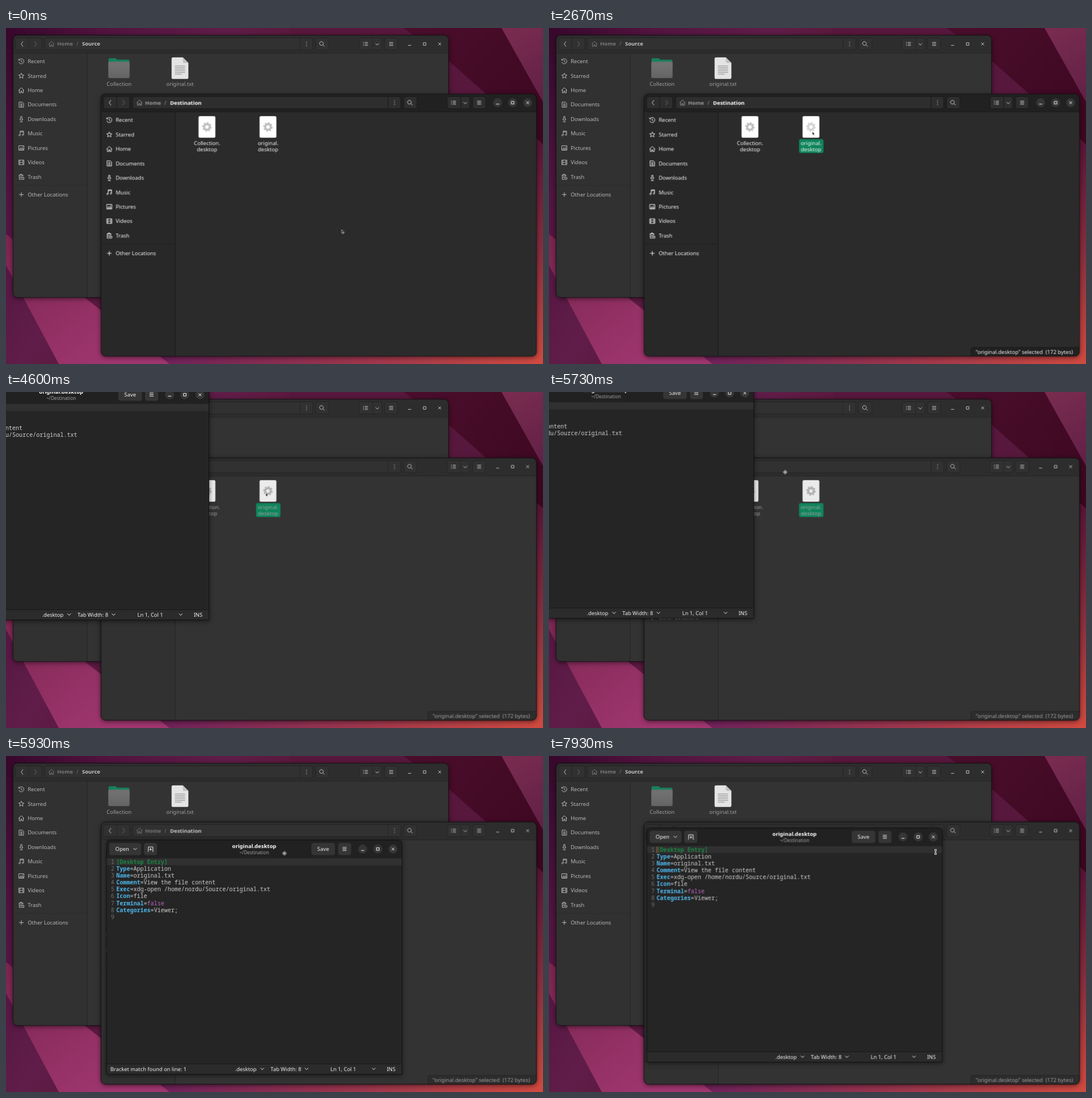
Recreate the animation shown at these times as an HTML page. Size 946 by 592 pixels, loop 8 s.

```html
<!DOCTYPE html>
<html lang="en">
<head>
<meta charset="utf-8">
<title>Desktop launcher files</title>
<style>
html, body { margin: 0; width: 100%; height: 100%; overflow: hidden; background: #37082c; }
svg { display: block; width: 100vw; height: 100vh; }
text { font: 9.5px "Noto Sans", "Open Sans", sans-serif; white-space: pre; }
.bold { font-weight: 700; }
.small { font-size: 8.2px; }
.status { font-size: 9.35px; }
.code { font: 10.05px "Noto Sans Mono", "DejaVu Sans Mono", monospace; }
.mid { text-anchor: middle; }
.end { text-anchor: end; }
.line { fill: none; stroke-width: 1; }
.shadow { filter: drop-shadow(0 2px 4px rgba(0, 0, 0, .5)); }
</style>
</head>
<body>
<svg id="stage" viewBox="0 0 946 592"></svg>
<script>
const LOOP = 8000, FRAMES = 120;

const FOCUSED = { head: '#212121', side: '#282828', body: '#2b2b2b', edge: '#191919', button: '#2e2e2e',
  text: '#f4f4f4', title: '#ffffff', label: '#f4f4f4', dim: '#9a9a9a', icon: '#dadada', paper: 1, ring: '#353535' };
const BACKDROP = { head: '#2d2d2d', side: '#313131', body: '#333333', edge: '#242424', button: '#313131',
  text: '#b8b8b8', title: '#c4c4c4', label: '#a0a0a0', dim: '#777777', icon: '#c4c4c4', paper: .9, ring: 'none' };

const ICONS = {
  Recent: 'M-4-2.3A4.5 4.5 0 1 1-4.4 1M-4.6-4.5V-2H-2.2M0-2.6V.4L2 1.6',
  Starred: 'M0-4.6 1.3-1.5 4.7-1.3 2.1.8 3 4.1 0 2.3-3 4.1-2.1.8-4.7-1.3-1.3-1.5Z',
  Home: 'M-5 .3 0-4.5 5 .3M-3.5-.8V4.5H-1V1.5H1V4.5H3.5V-.8',
  Documents: 'M-4-4.5H2L4-2.5V4.5H-4ZM-2-1.5H2M-2 .5H2M-2 2.5H2',
  Downloads: 'M-1.2-4.5H1.2V.4H3L0 3.2-3 .4H-1.2ZM-2.5 4.8H2.5',
  Music: 'M-2 3V-4.3H4V2.2M-2-2.8H4M-2 3A1.3 1.3 0 1 1-2 2.9M4 2.2A1.3 1.3 0 1 1 4 2.1',
  Pictures: 'M-4.5-4H4.5V4H-4.5ZM-3 2.5-1-.5.5 1.2 2-.6 3.2 2.5ZM1.5-2.2H2.6',
  Videos: 'M-4.5-4H4.5V4H-4.5ZM-2.7-4V4M2.7-4V4M-2.7 0H2.7',
  Trash: 'M-4.5-3H3.5M-2-3V-4.5H1V-3M-3.6-3V4.5H0M2.6-3V-.5M-1.6-1V2.5M.5-1V1M4.5 4.5H1V1H4.5Z',
  plus: 'M-4 0H4M0-4V4',
  back: 'M1.5-4.5-1.8 0 1.5 4.5',
  next: 'M-1.5-4.5 1.8 0-1.5 4.5',
  down: 'M-3-1.5 0 1.5 3-1.5',
  dots: 'M-.7-3.5H.7M-.7 0H.7M-.7 3.5H.7',
  find: 'M2-.8A3.3 3.3 0 1 1 2-.9M1.3 1.6 4.3 4.5',
  list: 'M-4.5-2.7H-3M-4.5 0H-3M-4.5 2.7H-3M-1.5-2.7H4M-1.5 0H4M-1.5 2.7H4',
  menu: 'M-3.5-2.7H3.5M-3.5 0H3.5M-3.5 2.7H3.5',
  min: 'M-2.7 2.5H2.7',
  max: 'M-2.3-2.3H2.3V2.3H-2.3Z',
  close: 'M-2.5-2.5 2.5 2.5M2.5-2.5-2.5 2.5',
  tab: 'M-4 4.5H-5M-4 4V-3.5H4V4.5H5M0-1.5V3M-2.2.8H2.2'
};

const at = (x, y, body, extra = '') => `<g transform="translate(${x} ${y})" ${extra}>${body}</g>`;
const icon = (name, x, y, color) => at(x, y, `<path class="line" stroke="${color}" d="${ICONS[name]}"/>`);
const rect = (x, y, w, h, fill, r = 0, extra = '') =>
  `<rect x="${x}" y="${y}" width="${w}" height="${h}" rx="${r}" fill="${fill}" ${extra}/>`;
const text = (str, x, y, fill, cls = '') => `<text x="${x}" y="${y + 3.4}" fill="${fill}" class="${cls}">${str}</text>`;
const poly = (points, fill) => `<polygon points="${points}" fill="${fill}"/>`;
const gradient = (id, x1, y1, x2, y2, ...stops) =>
  `<linearGradient id="${id}" gradientUnits="userSpaceOnUse" x1="${x1}" y1="${y1}" x2="${x2}" y2="${y2}">` +
  stops.map(([o, c]) => `<stop offset="${o}" stop-color="${c}"/>`).join('') + '</linearGradient>';

function wallpaper() {
  return `<defs>
    ${gradient('base', 0, 0, 946, 592, [0, '#37082c'], [.14, '#521440'], [.3, '#601d49'], [.38, '#5b193e'], [.5, '#71235a'], [.8, '#a63a4b'], [1, '#d04a40'])}
    ${gradient('band', 0, 363, 180, 592, [0, '#79264f'], [1, '#a0366f'])}
    ${gradient('glow', 873, 0, 946, 130, [0, '#7a2c50'], [1, '#612046'])}
    ${gradient('dark', 720, 0, 946, 200, [0, '#4a0e2c'], [1, '#3d0720'])}
    ${gradient('warm', 0, 205, 0, 592, [0, '#5a1638'], [.5, '#8a2f3e'], [1, '#d04a40'])}
    ${gradient('cover', 0, 54, 0, 90, [0, '#707070'], [1, '#5c5c5c'])}
    <clipPath id="frame">${rect(0, 0, 767, 462, '#000', 8)}</clipPath>
  </defs>` +
    rect(0, 0, 946, 592, 'url(#base)') +
    rect(500, 0, 446, 205, '#58183d') +
    rect(930, 200, 16, 392, 'url(#warm)') +
    poly('700,0 873,0 946,130 946,205 780,58', 'url(#dark)') +
    poly('873,0 946,0 946,130', 'url(#glow)') +
    poly('0,363 140,476 288,592 93,592 0,418', 'url(#band)');
}

const gear = (x, y) => at(x, y, `<g fill="none" stroke="currentColor">
  <circle r="4.9" stroke-width="3.6"/><circle r="7.1" stroke-width="2.6" pathLength="16" stroke-dasharray="1"/></g>`);

const launcher = (x, c, cls) => `<g opacity="${c.paper}">${rect(x - 14.8, 39, 29.6, 38, '#fff', 2.5)}
  <g class="${cls}" color="#bfbfbf">${gear(x, 58)}</g></g>`;

function folder(x) {
  return `<path fill="#17805c" d="M${x - 18.5} 75V43q0-2.5 2.5-2.5H${x - 6}l3 2.5H${x + 16}q2.5 0 2.5 2.5V60z"/>` +
    rect(x - 18.7, 46.5, 37.4, 29, 'url(#cover)', 2.5);
}

function textFile(x) {
  const rows = [...Array(6)].map((_, i) => `M${x - 9} ${54 + i * 2.9}h${i === 5 ? 12 : 18}`).join('');
  return `<path fill="#e4e4e4" d="M${x - 14.8} 41.5q0-2.5 2.5-2.5H${x + 5}l9.8 9.8V74.500q0 2.500-2.500 2.500h-24.600q-2.500 0-2.500-2.500z"/>
    <path fill="#c2c2c2" d="M${x + 5} 39v7.300q0 2.500 2.500 2.500h7.300z"/>
    <path class="line" stroke="#8d8d8d" d="${rows}"/>`;
}

function controls(xs, y, c) {
  return ['min', 'max', 'close'].map((name, i) =>
    `<circle cx="${xs[i]}" cy="${y}" r="8" fill="${c.ring}"/>` + icon(name, xs[i], y, c.title)).join('');
}

function fileWindow(c, place, content) {
  const button = (x, w) => rect(x, 4.5, w, 21.5, c.button, 3.5, `stroke="${c.edge}"`);
  const places = ['Recent', 'Starred', 'Home', 'Documents', 'Downloads', 'Music', 'Pictures', 'Videos', 'Trash'];
  const rows = places.map((name, i) => {
    const y = 46 + i * 25.43;
    return icon(name, 14.5, y, c.text) + text(name, 25.7, y, c.text);
  }).join('');
  return `<g clip-path="url(#frame)">` +
    rect(0, 0, 767, 462, c.body) + rect(0, 31, 130, 431, c.side) + rect(0, 0, 767, 31, c.head) +
    `<path class="line" stroke="${c.edge}" d="M0 31.500H767M130.500 31V462"/>
     <path class="line" stroke="${c.edge}" opacity=".5" d="M0 264.500H130"/>` +
    button(4.5, 46) + button(55.5, 472.5) + button(533, 23.5) + button(609.5, 40) + button(654.5, 23) +
    `<path class="line" stroke="${c.edge}" d="M27.500 5V26M505.500 5V26M633.500 5V26"/>` +
    icon('back', 16, 15.3, c.icon) + icon('next', 39.5, 15.3, '#6c6c6c') +
    icon('Home', 67.7, 15.3, c.dim) + text('Home', 77.5, 15.3, c.dim, 'bold') +
    text('/', 111.5, 15.3, c.dim) + text(place, 121.5, 15.3, c.title, 'bold') +
    icon('dots', 517, 15.3, c.icon) + icon('find', 544.5, 15.3, c.icon) + icon('list', 621, 15.3, c.icon) +
    icon('down', 641.5, 15.8, c.icon) + icon('menu', 666, 15.3, c.icon) +
    controls([698.5, 725, 751.5], 15.3, c) + rows +
    icon('plus', 14.5, 280.7, c.text) + text('Other Locations', 25.7, 280.7, c.text) + content +
    `</g>` + rect(0, 0, 767, 462, 'none', 8, 'stroke="#101010" stroke-opacity=".8"');
}

const sourceItems = c => folder(186.5) + textFile(294) +
  text('Collection', 186.7, 86, c.label, 'mid') + text('original.txt', 294, 86, c.label, 'mid');

function destinationItems(c, key) {
  const label = (name, x) => text(name, x, 86.3, c.label, 'mid') + text('desktop', x, 97.5, c.label, 'mid');
  return launcher(186.5, c, '') + launcher(294, c, key + '-gear') +
    rect(273, 79.5, 43, 24.5, '#0f845b', 3, `class="${key}-pick"`) +
    label('Collection.', 186.7) + label('original.', 294.2) +
    `<g class="${key}-info">` + rect(576, 446.5, 200, 20, c.head, 3, `stroke="${c.edge}"`) +
    text('“original.desktop” selected\u00a0 (172 bytes)', 584.3, 454.3, c.label) + '</g>';
}

function codeLine(line, i) {
  const y = 38.8 + i * 12.05;
  const [key, value] = line.split('=');
  const color = value === 'false' ? '#bd6bc4' : '#d0d0d0';
  const body = value
    ? `<tspan class="bold" fill="#50b8ee">${key}</tspan><tspan fill="#d0d0d0">=</tspan><tspan fill="${color}">${value}</tspan>`
    : `<tspan class="bold" fill="#1c8746">${key}</tspan>`;
  return text(i + 1, 13.7, y, '#727272', 'code end') + text(body, 17.3, y, '#d0d0d0', 'code');
}

function editorWindow() {
  const lines = ['[Desktop Entry]', 'Type=Application', 'Name=original.txt', 'Comment=View the file content',
    'Exec=xdg-open /home/nordu/Source/original.txt', 'Icon=file', 'Terminal=false', 'Categories=Viewer;', ''];
  const button = (x, w) => rect(x, 5, w, 21.5, '#353535', 4);
  const white = '#f4f4f4';
  return rect(0, 0, 520.5, 412.5, '#252525', 7) + rect(0, 20, 520.5, 392.5, '#252525') +
    `<path fill="#212121" d="M0 32V7Q0 0 7 0H513.500Q520.500 0 520.500 7V32Z"/>` +
    rect(0, 32, 520.5, 12.5, '#303030') +
    button(5, 56) + button(66, 23) + button(361, 41.5) + button(408, 23) +
    text('Open', 15.5, 15.6, white) + icon('down', 50.3, 15.6, white) + icon('tab', 77.7, 15.6, white) +
    text('original.desktop', 260.2, 11, '#fff', 'bold mid') + text('~/Destination', 260.2, 21.4, '#a2a2a2', 'small mid') +
    text('Save', 381.7, 15.6, white, 'mid') + icon('menu', 419.3, 15.6, white) +
    controls([451.3, 478, 504.7], 15.8, FOCUSED) + lines.map(codeLine).join('') +
    rect(17.3, 33, 1, 11.5, '#d9593f', 0, 'class="caret"') +
    rect(0, 394, 520.5, 18.5, '#2b2b2b') + `<path class="line" stroke="#181818" d="M0 394.500H520.500"/>` +
    text('~/Destination/origi…', 217, 403.5, '#c8c8c8', 'status end loading') +
    text('Bracket match found on line: 1', 6.8, 403.5, white, 'status bracket') +
    text('.desktop', 226.5, 403.2, white, 'status') + icon('down', 274.3, 403, white) +
    text('Tab Width: 8', 289, 403.2, white, 'status') + icon('down', 352.5, 403, white) +
    text('Ln 1, Col 1', 394.5, 403.2, white, 'status') + icon('down', 470.8, 403, white) +
    text('INS', 493.7, 403.7, white, 'status') +
    `<path class="line" stroke="#0e0e0e" stroke-opacity=".8" d="M0 412.500V7Q0 0 7 0H513.500Q520.500 0 520.500 7V412.500Z"/>`;
}

const pointers = `<g class="pointer" stroke-linejoin="round">
  <path class="arrow" fill="#000" stroke="#fff" stroke-width=".7" d="M0 0V6L1.400 4.900 2.400 7 3.400 6.600 2.400 4.500H4.300Z"/>
  <g class="move"><path fill="#111" stroke="#fff" stroke-width=".9" d="M0-3.500 3.500 0 0 3.500-3.500 0Z"/>
    <path class="line" stroke="#fff" stroke-width=".8" d="M-2 0H2M0-2V2"/></g>
  <g class="beam" fill="none"><path stroke="#fff" stroke-width="2.400" d="M-2-3.500H2M0-3.500V3.500M-2 3.500H2"/>
    <path stroke="#111" stroke-width=".8" d="M-1.500-3.500H1.500M0-3.500V3.500M-1.500 3.500H1.500"/></g>
</g>`;

const stage = document.getElementById('stage');
stage.innerHTML = wallpaper() +
  at(12.5, 12.8, fileWindow(BACKDROP, 'Source', sourceItems(BACKDROP)), 'class="shadow"') +
  at(167.5, 116.3,
    fileWindow(FOCUSED, 'Destination', destinationItems(FOCUSED, 'front')) +
    `<g class="faded">${fileWindow(BACKDROP, 'Destination', destinationItems(BACKDROP, 'rear'))}</g>`, 'class="shadow"') +
  `<g class="editor"><g class="opening shadow">${editorWindow()}</g></g>` + pointers;

// Rows are [ms, value]; every time snaps to the 15 fps grid.
function play(selector, prop, rows, hold) {
  const el = stage.querySelector(selector);
  const frames = rows.map(([ms, value]) => ({
    offset: ms ? (Math.round(ms * FRAMES / LOOP) - .01) / FRAMES : 0,
    [prop]: value, easing: hold ? 'step-end' : 'linear'
  }));
  if (rows[0][0]) frames.unshift({ ...frames[0], offset: 0 });
  frames.push({ ...frames[frames.length - 1], offset: 1 });
  el.animate(frames, { duration: LOOP, delay: -5, iterations: Infinity, easing: `steps(${FRAMES})` });
}
const show = (selector, ...rows) => play(selector, 'opacity', rows, true);
const path = (selector, ...rows) =>
  play(selector, 'transform', rows.map(([ms, x, y]) => [ms, `translate(${x}px, ${y}px)`]));

path('.pointer',
  [0, 591.5, 355.5], [670, 591.5, 355.5], [730, 588, 350], [870, 565, 318], [1130, 495, 222], [1270, 471, 191], [1470, 464, 182.5],
  [4530, 464, 182.5], [4600, 458, 178], [4730, 395, 140], [4870, 270, 80], [5000, 165, 30], [5130, 119, 12], [5270, 149, 12],
  [5470, 149, 12], [5530, 162, 16], [5600, 230, 45], [5730, 415.5, 141], [5800, 462, 163], [5870, 484, 170.500],
  [5930, 490.500, 171.500], [6000, 490, 166], [6130, 485, 152], [6200, 483, 149],
  [6400, 483, 149], [6470, 470, 146], [6600, 400, 126], [6730, 270, 117], [6870, 160, 135], [6930, 131, 165],
  [7070, 135, 225], [7200, 185, 256], [7270, 213, 259],
  [7330, 240, 258], [7470, 330, 232], [7600, 470, 150], [7730, 600, 108], [7800, 655, 115], [7870, 679, 140], [7930, 681, 169]);
show('.arrow', [0, 1], [4800, 0], [5070, 1], [5530, 0], [6470, 1], [7200, 0], [7600, 1], [7930, 0]);
show('.beam', [0, 0], [4800, 1], [5070, 0], [7200, 1], [7600, 0], [7930, 1]);
show('.move', [0, 0], [5530, 1], [6470, 0]);

play('.front-gear', 'color', [[0, '#bfbfbf'], [1200, '#d4d4d4']], true);
show('.front-pick', [0, 0], [2400, 1]);
show('.front-info', [0, 0], [2670, 1]);
show('.faded', [0, 0], [3870, .4], [3930, .75], [4000, .93], [4070, 1]);

path('.editor', [0, -163, -11], [5530, -163, -11], [5730, -162, -15], [5800, 60, 95], [5870, 160, 142],
  [5930, 177, 148.200], [6000, 177.500, 143], [6130, 174, 129.500], [6200, 172.300, 126.700]);
show('.opening', [0, 0], [3870, .8], [3930, .95], [4000, 1]);
stage.querySelector('.opening').style.transformOrigin = '260.25px 412.5px';
play('.opening', 'transform', [[0, 'scale(.77)'], [3870, 'scale(.77)'], [3930, 'scale(.93)'], [4000, 'scale(.98)'], [4070, 'scale(1)']]);
show('.loading', [0, 1], [4000, 0]);
show('.bracket', [0, 0], [4000, 1], [6870, 0]);
show('.caret', [0, 0], [6600, 1]);
</script>
</body>
</html>
```
